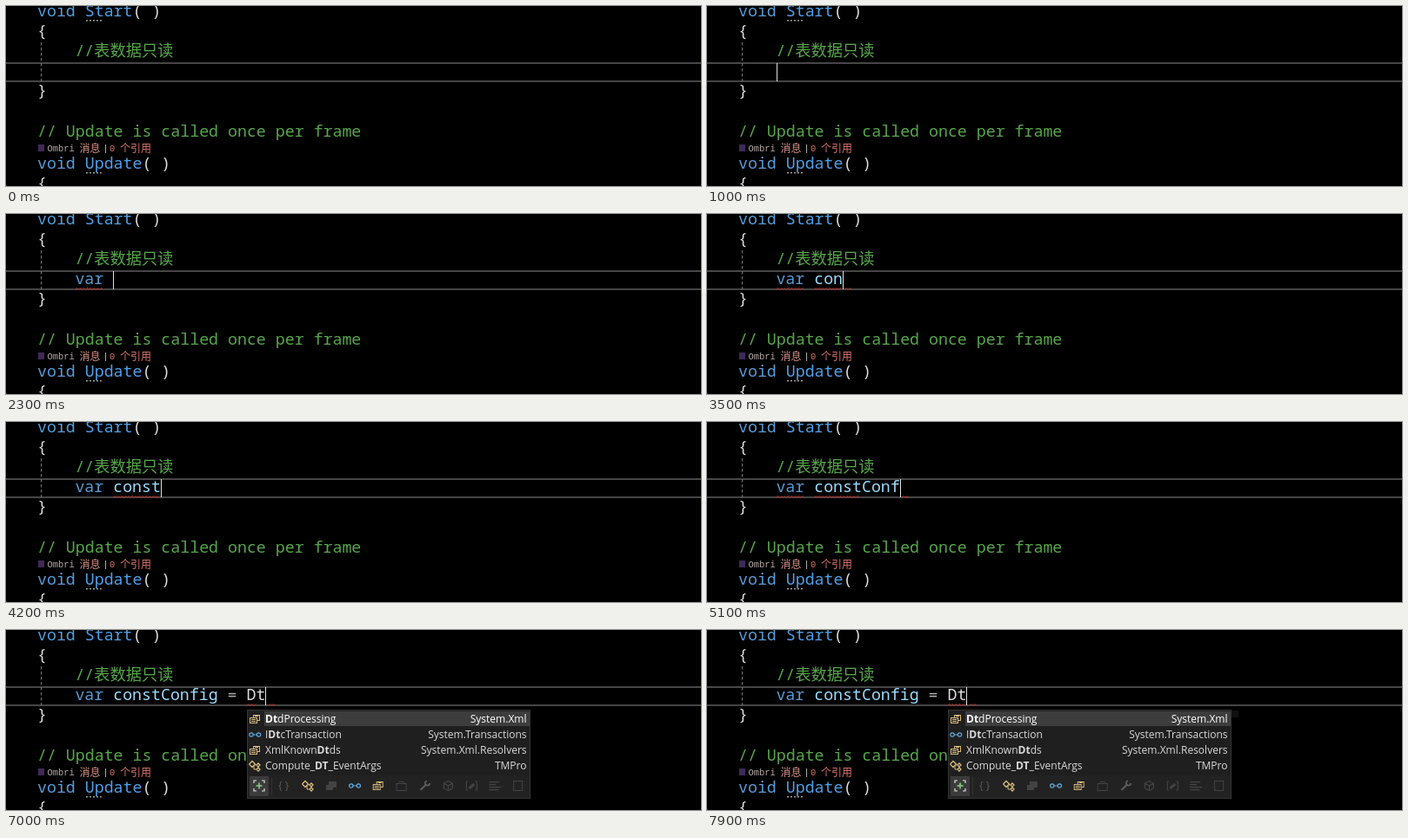
Recreate the animation shown at these times as an HTML page with a canvas. Size 799 by 208 pixels, loop 8 s.

```html
<!DOCTYPE html>
<html lang="zh">
<head>
<meta charset="utf-8">
<style>
  html, body { margin: 0; width: 100%; height: 100%; overflow: hidden; background: #000; }
  canvas { display: block; }
</style>
</head>
<body>
<canvas id="stage" width="799" height="208"></canvas>
<script>
const ctx = document.getElementById('stage').getContext('2d');
const LOOP = 8000, ADVANCE = 10.95, LINE = 23.1, LEFT = 36, INDENT = 79.4;
const CODE = '18.25px "Noto Sans Mono", "Noto Sans CJK SC", monospace';
const LENS = '10.4px "Liberation Mono", monospace';
const LENS_CJK = '12px "Noto Sans CJK SC", sans-serif';
const UI = '"Open Sans", "Noto Sans CJK SC", sans-serif';
const LIST = '12px ' + UI, TYPED = '16.5px ' + UI;
const KEYWORD = '#569cd6', COMMENT = '#57a64a', LOCAL = '#9cdcfe', PLAIN = '#dcdcdc';
const ORANGE = '#d7ba7d', BLUE = '#5fa8dc', DIM = '#434343';

// [start time, text on the edited line, then squiggles as column pairs]
const edits = [
  [1700, 'var'],
  [1900, 'var', 0, 3, 3, 4],
  [2300, 'var ', 0, 3],
  [2400, 'var c', 0, 3],
  [2500, 'var co', 0, 3],
  [2700, 'var con', 0, 3, 4, 5],
  [2800, 'var cont', 0, 3, 4, 7],
  [2900, 'var conts', 0, 3, 4, 8],
  [3000, 'var conts', 0, 3, 4, 9, 9, 10],
  [3300, 'var cont', 0, 3, 4, 9, 9, 10],
  [3400, 'var con', 0, 3, 4, 9],
  [3500, 'var con', 0, 3, 4, 7, 7.2, 8.1],
  [3700, 'var con', 4, 7, 7.2, 8.1],
  [3900, 'var cons', 4, 7, 8.2, 9.1],
  [4100, 'var const', 4, 7],
  [4200, 'var const', 4, 9],
  [4400, 'var const', 0, 3, 4, 8.9, 9.2, 10.1]
];
[...'Config'].forEach((_, i) => edits.push(
  [4800 + i * 100, 'var const' + 'Config'.slice(0, i + 1), 0, 3, 4, 8.9, 10.2 + i, 11.1 + i]));
edits.push(
  [5500, 'var constConfig ', 0, 3, 4, 8.9, 16, 17],
  [5600, 'var constConfig =', 0, 3],
  [5700, 'var constConfig = ', 0, 3],
  [5800, 'var constConfig = ', 18, 19],
  [6700, 'var constConfig = D', 18, 19],
  [6900, 'var constConfig = Dt', 18, 19, 20.3, 21.2],
  [7200, 'var constConfig = Dt', 18, 20, 20.3, 21.2]
);

const completions = [
  ['enum', '*Dt*dProcessing', 'System.Xml'],
  ['interface', 'I*Dt*cTransaction', 'System.Transactions'],
  ['enum', 'XmlKnown*Dt*ds', 'System.Xml.Resolvers'],
  ['class', 'Compute_*DT*_EventArgs', 'TMPro']
];

function rect(x, y, w, h, color) {
  ctx.fillStyle = color;
  ctx.fillRect(x, y, w, h);
}

function text(str, x, y, color, font = CODE) {
  ctx.font = font;
  ctx.fillStyle = color;
  ctx.fillText(str, x, y);
  return x + ctx.measureText(str).width;
}

function path(color, width, points) {
  ctx.strokeStyle = color;
  ctx.lineWidth = width;
  ctx.beginPath();
  points.forEach(([x, y]) => ctx.lineTo(x, y));
  ctx.stroke();
}

function ring(x, y, r, color, width = 1.2, from = 0, to = Math.PI * 2) {
  ctx.strokeStyle = color;
  ctx.lineWidth = width;
  ctx.beginPath();
  ctx.arc(x, y, r, from, to);
  ctx.stroke();
}

function outline(x, y, w, h, color) {
  ctx.strokeStyle = color;
  ctx.lineWidth = 1;
  ctx.strokeRect(x + 0.5, y + 0.5, w, h);
}

const baseline = row => Math.round(12 + LINE * row);
const column = n => INDENT + n * ADVANCE;

function dots(x, y) {
  for (let i = 0; i < 5; i++) rect(x + i * 4, y, 2, 1.5, '#999');
}

function squiggle(from, to) {
  const points = [];
  for (let x = column(from), i = 0; x < column(to); x += 2, i++) points.push([x, i % 2 ? 85.5 : 87.5]);
  path('#c8302c', 1, points);
}

function method(name, y) {
  text('void', LEFT, y, KEYWORD);
  text(name, LEFT + 5 * ADVANCE, y, '#4fa0e6');
  text('( )', LEFT + (5 + name.length) * ADVANCE, y, PLAIN);
}

function page(t) {
  rect(0, 0, 799, 208, '#000');
  const row = t >= 600 && t < 900 ? 4 : 3, top = baseline(row) - 16;
  rect(0, top, 799, 2, '#464646');
  rect(0, top + 21, 799, 2, '#464646');

  for (let y = 42; y < 87; y += 6) rect(40, y, 1, 3.5, '#777');
  method('Start', baseline(0));
  if (t < 1700) dots(92, 16);
  text('{', LEFT, baseline(1), PLAIN);
  text('//表数据只读', INDENT, baseline(2), COMMENT);
  text('}', LEFT, baseline(4), PLAIN);
  text('// Update is called once per frame', LEFT, baseline(6), COMMENT);

  rect(37, 160, 7, 8, '#3f2a55');
  text('Ombri', 47.5, 168, '#b5aaa8', LENS);
  text('消息', 84.5, 168.5, '#d9958a', LENS_CJK);
  text('|', 111.5, 168, '#ccc', LENS);
  text('0', 119, 168, '#e0776c', LENS);
  text('个引用', 131, 168.5, '#e0776c', LENS_CJK);
  method('Update', 188);
  dots(92, 192);
  text('{', LEFT, 211, PLAIN);
  ring(4, 204, 5, '#444', 1, Math.PI / 2, Math.PI);
}

function inputMethod(t) {
  const typed = 'var'.slice(0, t < 1300 ? 1 : t < 1500 ? 2 : 3);
  ctx.font = TYPED;
  const w = ctx.measureText(typed).width;
  rect(80, 67, w + 1.5, 22, '#fff');
  text(typed, 80.5, 84, '#000', TYPED);
  rect(77, 93, w + 35, 44, '#503434');
  text(typed, 94, 122, '#fff', TYPED);
  const x = 77 + w + 35;
  rect(x, 93, 43.5, 44, '#fff');
  ring(x + 21.5, 115, 8, '#111', 1.5);
  ring(x + 21.5, 115.5, 4.5, '#111', 1.3, 0.3, Math.PI - 0.3);
  rect(x + 18, 111, 2, 2.5, '#111');
  rect(x + 23.5, 111, 2, 2.5, '#111');
}

function editedLine(t) {
  const [, str, ...spans] = edits.findLast(e => t >= e[0]);
  const y = baseline(3);
  const [kw, name = '', op = '', value = ''] = str.split(' ');
  text(kw, INDENT, y, KEYWORD);
  text(name, column(4), y, name === 'const' && t >= 4400 ? KEYWORD : LOCAL);
  text(op, column(16), y, '#b4b4b4');
  text(value, column(18), y, PLAIN);
  for (let i = 0; i < spans.length; i += 2) squiggle(spans[i], spans[i + 1]);
  if (t < 6200 || t >= 6700) caret(column(str.length));
}

function caret(x, y = 66) {
  rect(Math.round(x), y, 1, 21, '#e0e0e0');
}

const icons = {
  enum(x, y, c) {
    outline(x - 2, y - 5, 7, 6, c);
    rect(x - 6, y - 2, 9, 7, '#262626');
    outline(x - 6, y - 2, 8, 6, c);
    rect(x - 4, y, 5, 1, c);
    rect(x - 4, y + 2, 5, 1, c);
    rect(x, y - 4, 4, 1, c);
  },
  interface(x, y, c) {
    ring(x - 4, y, 2.2, c);
    ring(x + 4.5, y, 2.2, c);
    path(c, 1, [[x - 2, y], [x + 2, y]]);
  },
  class(x, y, c) {
    const diamond = (cx, cy, r) => path(c, 1.3,
      [[cx - r, cy], [cx, cy - r], [cx + r, cy], [cx, cy + r], [cx - r, cy]]);
    diamond(x - 3, y - 2, 3.5);
    diamond(x + 4, y - 1, 2);
    diamond(x + 4, y + 4, 2);
    path(c, 1, [[x, y - 1], [x + 2, y - 1]]);
    path(c, 1, [[x - 1, y], [x - 1, y + 4], [x + 2, y + 4]]);
  },
  struct(x, y, c) {
    rect(x - 3, y - 5, 9, 7, c);
    rect(x - 6, y - 1, 8, 6, c);
  },
  event(x, y, c) {
    outline(x - 6, y - 3, 11, 8, c);
    outline(x - 3, y - 5, 5, 2, c);
  },
  wrench(x, y, c) {
    path(c, 2.2, [[x - 5, y + 5], [x + 2, y - 2]]);
    ring(x + 3, y - 3, 2.7, c, 1.8, 0, 4.5);
  },
  cube(x, y, c) {
    path(c, 1.2, [[x - 5, y - 3], [x, y - 5.5], [x + 5, y - 3], [x + 5, y + 3],
      [x, y + 5.5], [x - 5, y + 3], [x - 5, y - 3], [x, y], [x + 5, y - 3]]);
    path(c, 1.2, [[x, y], [x, y + 5.5]]);
  },
  field(x, y, c) {
    path(c, 1.2, [[x - 4, y - 5], [x - 6, y - 5], [x - 6, y + 5], [x - 4, y + 5]]);
    path(c, 1.2, [[x + 4, y - 5], [x + 6, y - 5], [x + 6, y + 5], [x + 4, y + 5]]);
    path(c, 3, [[x - 3, y + 3], [x + 3, y - 2]]);
  },
  lines(x, y, c) {
    [12, 8, 14, 11].forEach((w, i) => rect(x - 7, y - 5 + i * 3, w, 1.3, c));
  },
  snippet(x, y, c) {
    outline(x - 6, y - 6, 10, 11, c);
    rect(x - 6, y + 5, 4, 1, c);
  }
};

function popup(t) {
  rect(277, 92, 326, 103, '#333');
  rect(278, 93, 324, 101, '#1f1f1f');
  if (t >= 7900) rect(603, 93, 8, 8, '#101010');
  rect(297, 94, 305, 17, '#3d3d3d');
  completions.forEach(([kind, label, space], i) => {
    const y = 107 + i * 18, color = i ? '#dadada' : '#fff';
    icons[kind](286, y - 4, kind === 'interface' ? BLUE : ORANGE);
    let x = 298;
    label.split('*').forEach((part, n) => {
      x = text(part, x, y, color, (n % 2 ? 'bold ' : '') + LIST);
    });
    ctx.textAlign = 'right';
    text(space, 598.5, y, color, LIST);
    ctx.textAlign = 'left';
  });

  rect(278, 168, 324, 26, '#222');
  rect(280, 169, 22, 23, '#3b3b3b');
  rect(305, 170, 1, 21, '#333');
  [[-6, -6], [6, -6], [6, 6], [-6, 6]].forEach(([dx, dy]) => {
    const x = 291 + dx, y = 180 + dy;
    path('#ddd', 1.2, [[x - dx / 2, y], [x, y], [x, y - dy / 2]]);
  });
  path('#8fd08a', 1.5, [[287.5, 180], [294.5, 180]]);
  path('#8fd08a', 1.5, [[291, 176.5], [291, 183.5]]);
  text('{ }', 313, 184, '#5a5a5a', LIST);
  ['class', 'struct', 'interface', 'enum', 'event', 'wrench', 'cube', 'field', 'lines', 'snippet']
    .forEach((kind, i) => {
      const color = { class: ORANGE, enum: ORANGE, interface: BLUE, wrench: '#5a5a5a' }[kind] || DIM;
      icons[kind](347 + i * 26.9, 180, color);
    });
}

function draw(t) {
  page(t);
  if (t >= 1700) editedLine(t);
  else if (t >= 1200) inputMethod(t);
  else if (t >= 900) caret(79.5);
  else if (t >= 600) caret(47, 89);
  if (t >= 6800) popup(t);
}

const start = performance.now();
function tick() {
  draw((performance.now() - start) % LOOP);
  requestAnimationFrame(tick);
}
tick();
</script>
</body>
</html>
```
